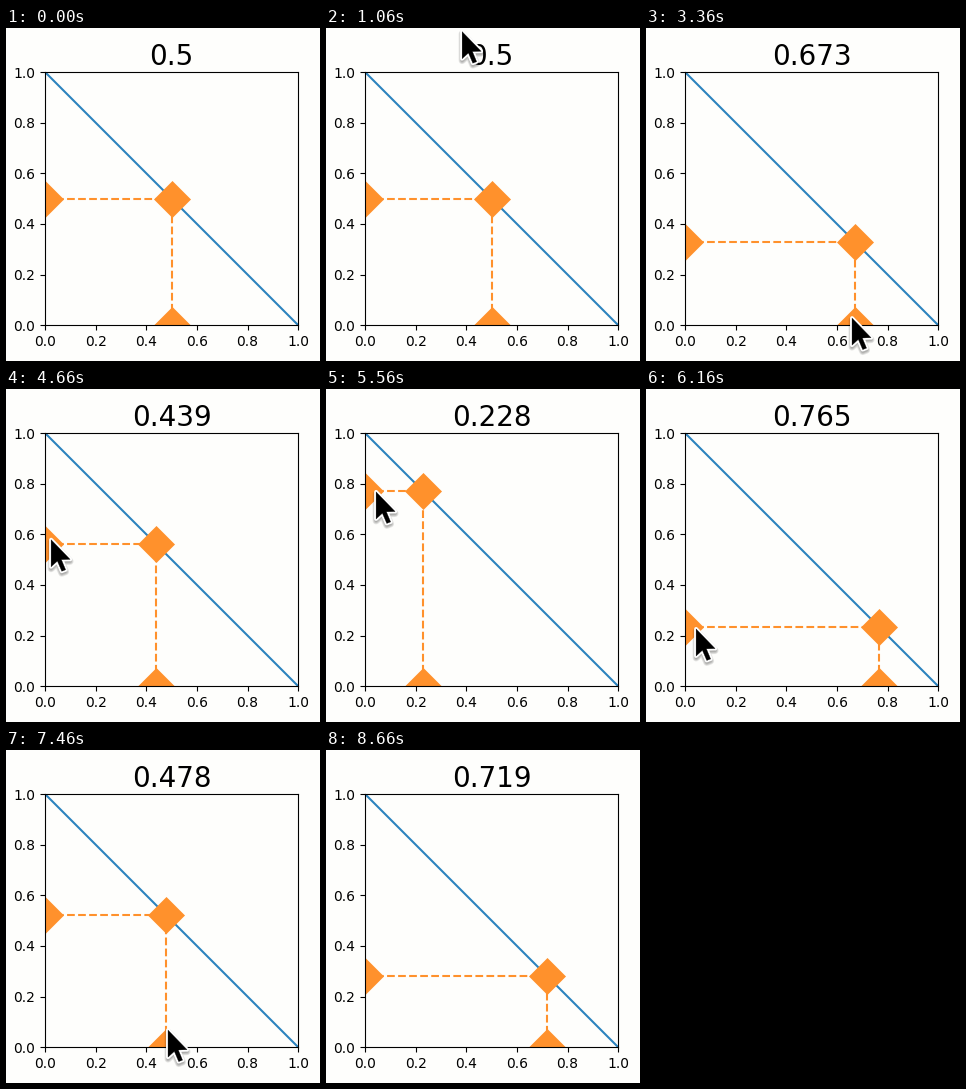
Write a matplotlib script that moves like this. It is 314 px wide and 333 px high and loops after 9230 ms.

```python
import numpy as np
import matplotlib.pyplot as plt
from matplotlib.animation import FuncAnimation
from matplotlib.patches import Polygon

W, H, DPI = 314, 333, 100
LEFT, BOTTOM, SIDE = 39.1, 35.9, 253
LOOP, STEP = 9230, 26
BLUE, ORANGE, PAPER = "#2c83be", "#ff912c", "#fefefc"

SHOW, TURN, EXIT, HIDE = 200, 1000, 8400, 8660
ENTRY_POINT, TURN_POINT, EXIT_POINT = (231, 338), (136, 3), (290, 205)
LEAD = 20  # ms by which the pointer runs ahead of the dragged handle

# handle places in axes units
HANDLES = {
    "left": lambda v: (0, 1 - v),
    "line": lambda v: (v, 1 - v),
    "bottom": lambda v: (v, 0),
}

# start ms, end ms, final value, handle, pointer offset from the handle
DRAGS = [
    (1930, 2397, .725, "line", (3, 1)),
    (3230, 3645, .522, "bottom", (0, -7)),
    (4500, 4977, .227, "left", (6, 0)),
    (5530, 6235, .788, "left", (11, 0)),
    (6930, 7440, .478, "bottom", (2, -17)),
    (7860, 8370, .719, "line", (3, 1)),
]

ARROW = np.array([(0, 0), (0, 27), (6.3, 21.3), (10.7, 31.5),
                  (14.5, 30), (10.3, 19.9), (19, 19.6)])


def ease(ms, start, end):
    u = np.clip((ms - start) / (end - start), 0, 1)
    return u * u * (3 - 2 * u)


def value_at(ms):
    v = .5
    for start, end, goal, _, _ in DRAGS:
        v += (goal - v) * ease(ms, start, end)
    return v


def grab_point(handle, offset, v):
    x, y = HANDLES[handle](v)
    return np.array([LEFT + SIDE * x, H - BOTTOM - SIDE * y]) + offset


def pointer_at(ms):
    """Pointer tip in pixels: travel to each handle, then stay with it."""
    v = value_at(ms + LEAD)
    tip = np.array(ENTRY_POINT, float)
    tip += (TURN_POINT - tip) * ease(ms, SHOW, TURN)
    free = TURN - 200
    for start, end, _, handle, offset in DRAGS:
        gap = start - free
        travel = ease(ms, free + .2 * gap, free + .85 * gap)
        tip += (grab_point(handle, offset, v) - tip) * travel
        free = end
    return tip + (EXIT_POINT - tip) * ease(ms, EXIT, HIDE)


fig = plt.figure(figsize=(W / DPI, H / DPI), dpi=DPI, facecolor=PAPER)
ax = fig.add_axes([LEFT / W, BOTTOM / H, SIDE / W, SIDE / H], facecolor=PAPER)
ax.set(xlim=(0, 1), ylim=(0, 1))
ax.plot([0, 1], [1, 0], color=BLUE, lw=1.5)
handles, = ax.plot([], [], "--D", color=ORANGE, lw=1.5, ms=18, mew=.5)
title = ax.set_title("0.5", fontsize=20, pad=5)

overlay = fig.add_axes([0, 0, 1, 1])
overlay.set(xlim=(0, W), ylim=(H, 0))
overlay.axis("off")


def arrow_layer(dy, color, width, alpha=1):
    patch = Polygon(ARROW, closed=True, facecolor=color, edgecolor=color,
                    lw=width * 72 / DPI, alpha=alpha, joinstyle="round")
    overlay.add_patch(patch)
    return patch, np.array([0, dy])


# soft shadow, white rim, black body
layers = [arrow_layer(2, "black", w, .09) for w in (7, 5.5, 4, 2.5)]
layers += [arrow_layer(0, "white", 4), arrow_layer(0, "black", .3)]


def update(i):
    ms = (i + .5) * STEP
    v = value_at(ms)
    handles.set_data([0, v, v], [1 - v, 1 - v, 0])
    title.set_text(str(round(float(v), 3)))
    tip = pointer_at(ms)
    for patch, shift in layers:
        patch.set_xy(ARROW + tip + shift)
        patch.set_visible(SHOW <= ms < HIDE)
    return [handles, title] + [patch for patch, _ in layers]


anim = FuncAnimation(fig, update, frames=LOOP // STEP, interval=STEP,
                     repeat=True, repeat_delay=0)
plt.show()
```
